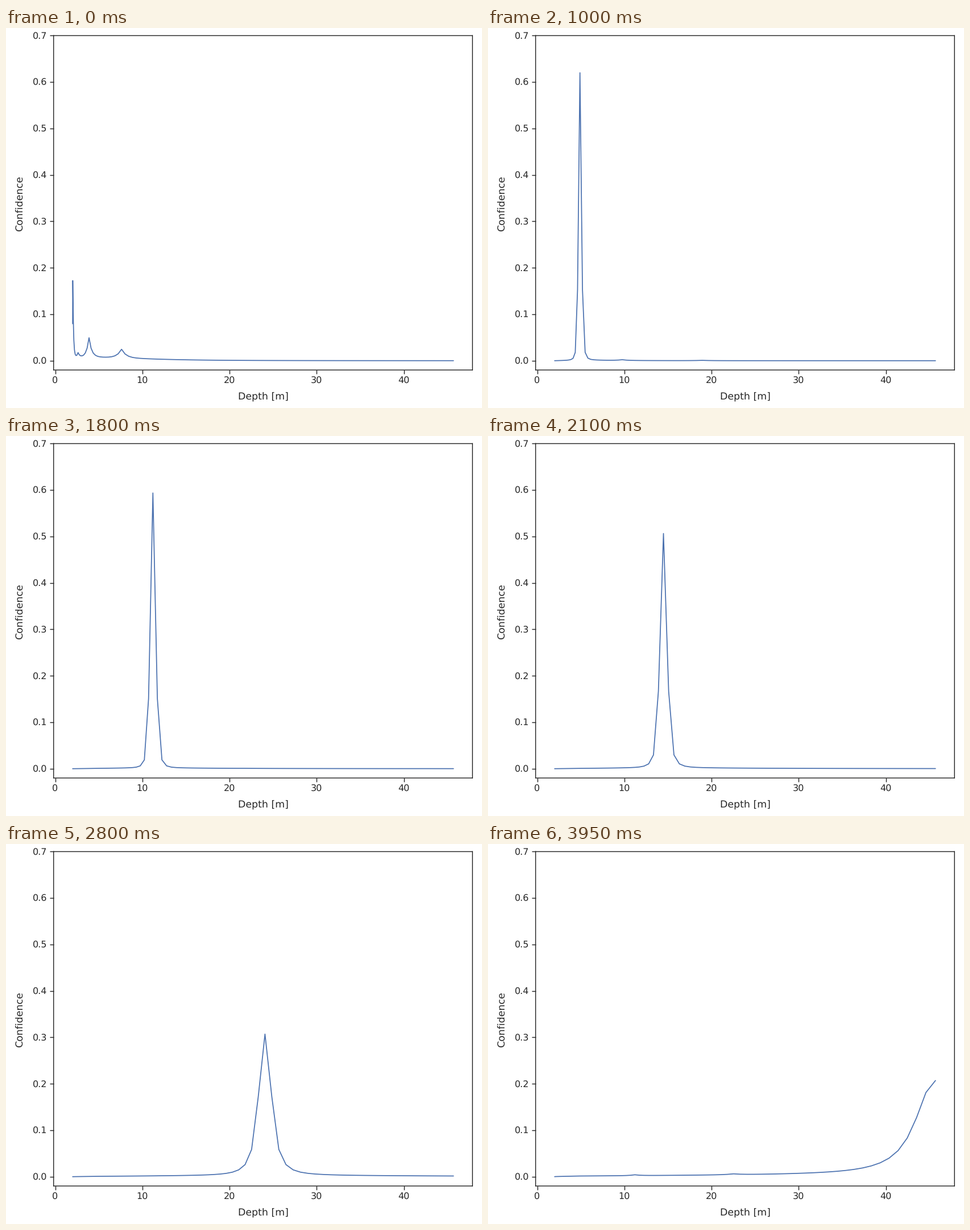
These frames come from a looping animation (837 by 669 pixels, 4 s). A matplotlib script:

```python
import numpy as np
import matplotlib.pyplot as plt
from matplotlib.animation import FuncAnimation

W, H, DPI = 837, 669, 83.7
LEFT, RIGHT, TOP, BOTTOM = 83.7, 820.3, 13.4, 602.1
BINS, D_MIN, D_MAX = 80, 2.0, 46.8
INK, BLUE = "#262626", "#4c72b0"

plt.rcParams.update({
    "font.family": "DejaVu Sans",
    "text.color": INK,
    "text.hinting": "none",
    "axes.edgecolor": INK,
    "axes.linewidth": 1.25,
    "xtick.color": INK,
    "ytick.color": INK,
    "path.snap": False,
})

# Linearly increasing depth bins
idx = np.arange(BINS)
STEP = (D_MAX - D_MIN) / (BINS * (BINS + 1))
depth = D_MIN + STEP * idx * (idx + 1)


def bin_of(d):
    """Bin nearest to depth d."""
    return round((np.sqrt(1 + 4 * max(d - D_MIN, 0) / STEP) - 1) / 2)


def spike(center, height, spread=1.3):
    return height * np.exp(-np.abs(idx - center) / spread)


def sharpness(k):
    """Rises over the near bins, then falls with depth."""
    return np.interp(k, [0, 8, 12, 25, 28, 36, 48, 65, 79],
                     [.25, .61, .515, .69, .64, .61, .406, .217, .135])


def main_peak(k):
    """Heavy-tailed peak on a faint floor, with a total of one."""
    s = sharpness(k)
    dist = np.abs(idx - k).astype(float)
    core = 1 / (1 + 8 * s**2 * dist ** (2.1 + 3.8 * s**2))
    level = .0058 * (k / 79) ** 1.5 + .004 * np.exp(-k / 20)
    floor = level * np.exp(-dist / (8 + k**2 / 200)) * np.clip(idx / 20, 0, 1)
    return core * (1 - floor.sum()) / core.sum() + floor


def nearest():
    """Blurred response for objects in the very first bin."""
    rise = .259 * (idx + .5) ** 1.7 * np.exp(-1.1 * idx)
    floor = .0075 * np.clip(idx / 10, 0, 1) / (1 + (idx / 36) ** 6)
    return rise + floor + spike(9, .01)


def confidence(k):
    """Mean confidence over all bins when bin k is the true one."""
    near = np.exp(-k / 1.5) if k else 1
    p = (1 - near) * main_peak(k) + near * nearest()

    # Faint echoes: at deeper multiples early on, at fractions late
    d = depth[k]
    early, late = np.exp(-k / 6), np.exp((k - 79) / 6)
    for n in (1, 2):
        p += spike(bin_of(d * 1.95**n), .042 * .44 ** (n - 1) * early)
        p += spike(bin_of(d / 2**n), .0018 * late)
    return p


fig = plt.figure(figsize=(W / DPI, H / DPI), dpi=DPI, facecolor="white")
ax = fig.add_axes([LEFT / W, 1 - BOTTOM / H, (RIGHT - LEFT) / W, (BOTTOM - TOP) / H])
margin = .05 * (depth[-1] - depth[0])
ax.set_xlim(depth[0] - margin, depth[-1] + margin)
ax.set_ylim(-.02, .7)
ax.set_xticks(range(0, 41, 10))
ax.set_yticks(np.arange(8) / 10)
ax.tick_params(length=6, width=1.25, pad=3.5, labelsize=13.75)

label = dict(fontsize=15, ha="center", va="baseline", rotation_mode="anchor")
fig.text((LEFT + RIGHT) / 2 / W, 1 - 654.3 / H, "Depth [m]", **label)
fig.text(30.2 / W, 1 - 308.7 / H, "Confidence", rotation=90, **label)

line, = ax.plot(depth, confidence(0), color=BLUE, lw=1.5, solid_capstyle="round")


def update(k):
    line.set_ydata(confidence(k))
    return line,


anim = FuncAnimation(fig, update, frames=BINS, interval=50, repeat=True, repeat_delay=0)
plt.show()
```
